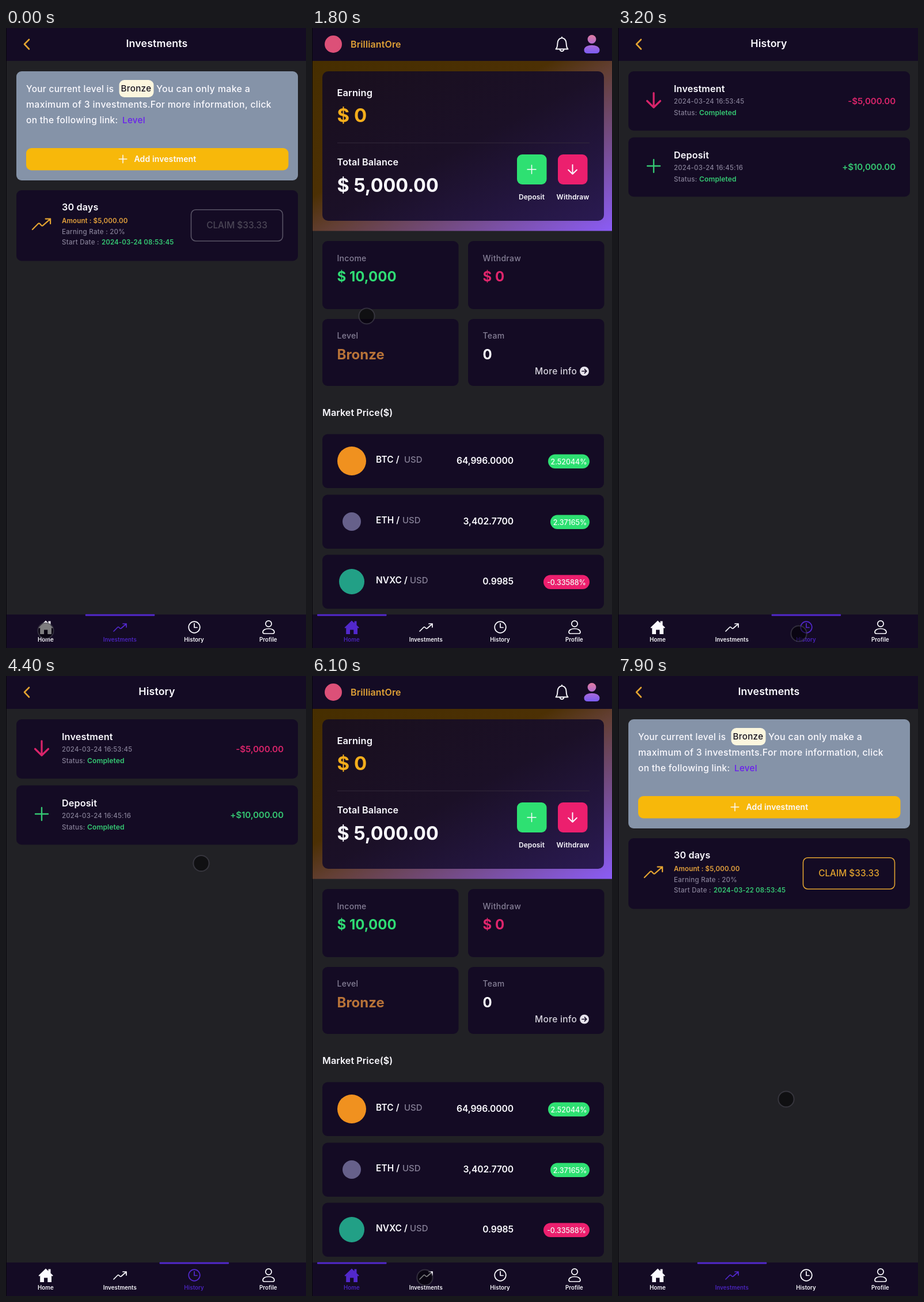
Write an HTML page that moves like this. It is 521 by 1074 pixels and loops after 8 s.

```html
<!DOCTYPE html>
<html lang="en">
<head>
<meta charset="utf-8">
<title>Investment app</title>
<style>
  html, body { margin: 0; width: 100%; height: 100%; overflow: hidden; background: #212125; }
  svg { display: block; width: 100%; height: 100%; }
  text { font-family: Inter, "Open Sans", sans-serif; white-space: pre; }
</style>
</head>
<body>
<svg id="stage" viewBox="0 0 521 1074"></svg>
<script>
const LOOP = 8000, STEP = 100;
const PANEL = '#140b24', GOLD = '#e2a331', GREEN = '#2ee072', PINK = '#ec1f6e';
const MUTED = '#857f96', WHITE = '#fbfaff', ACTIVE = '#5228cc';

// drawing helpers
const rect = (x, y, w, h, r, fill, more = '') =>
  `<rect x="${x}" y="${y}" width="${w}" height="${h}" rx="${r}" fill="${fill}" ${more}/>`;
const disc = (x, y, r, fill) => `<circle cx="${x}" cy="${y}" r="${r}" fill="${fill}"/>`;
const line = (d, color, width = 2) =>
  `<path d="${d}" fill="none" stroke="${color}" stroke-width="${width}" stroke-linecap="round" stroke-linejoin="round"/>`;
const text = (x, y, str, size, fill = WHITE, { w = 600, at = 'start', gap = 0.008 } = {}) =>
  `<text x="${x}" y="${y}" font-size="${size}" fill="${fill}" font-weight="${w}" text-anchor="${at}" letter-spacing="${gap * size}">${str}</text>`;
const plus = (x, y, r, color, width) => line(`M${x - r} ${y}h${2 * r}M${x} ${y - r}v${2 * r}`, color, width);
const down = (x, y, r, color, width) =>
  line(`M${x} ${y - r}v${2 * r}M${x - r * 0.92} ${y + r * 0.1}l${r * 0.92} ${r * 0.9}l${r * 0.92} ${-r * 0.9}`, color, width);
const trend = (x, y, k, color, width) =>
  line(`M${x - 11 * k} ${y + 6 * k}l${7 * k} ${-7 * k}q${k} ${-k} ${2 * k} 0l${2 * k} ${2 * k}q${k} ${k} ${2 * k} 0l${9 * k} ${-8 * k}m${-6 * k} 0h${6 * k}v${6 * k}`, color, width);
const card = (x, y, w, h) => rect(x, y, w, h, 9, PANEL);

const REG = { w: 450, gap: 0.02 }, BOLD = { w: 700, gap: 0 };
const MID = { at: 'middle' }, END = { at: 'end', gap: -0.008 };

const defs = `<defs>
  <linearGradient id="glow" x1="0" y1="0" x2="1" y2="1">
    <stop offset="0" stop-color="#462e00"/><stop offset=".4" stop-color="#4c3004"/>
    <stop offset=".52" stop-color="#633f34"/><stop offset="1" stop-color="#8b5cf6"/>
  </linearGradient>
  <linearGradient id="hero" x1="0" y1="0" x2="1" y2="1">
    <stop offset="0" stop-color="#190f1d"/><stop offset=".5" stop-color="#1b1027"/><stop offset="1" stop-color="#2a1a52"/>
  </linearGradient>
  <linearGradient id="user" gradientUnits="userSpaceOnUse" x1="0" y1="12" x2="0" y2="44">
    <stop offset="0" stop-color="#e07ca0"/><stop offset=".6" stop-color="#a468dc"/><stop offset="1" stop-color="#7a5cf2"/>
  </linearGradient>
</defs>`;

const backdrop = rect(0, 0, 521, 1074, 0, '#212125') + rect(0, 0, 521, 57, 0, PANEL);

const titleBar = title =>
  line('M40 20L32 28L40 36.5', GOLD, 2.6) + text(262, 33, title, 17.8, WHITE, MID);

function nav(active) {
  const items = [
    ['Home', c => `<path fill="${c}" d="M56.5 1038.5L69 1026.5L73.5 1030.8V1027.5H77.5V1034.6L81.8 1038.5L80.4 1040L79 1038.8V1050H72.3V1042.5H66V1050H59.2V1038.8L57.9 1040Z"/>`],
    ['Investments', c => trend(198, 1039, 1, c, 1.7)],
    ['History', c => `<circle cx="327" cy="1038" r="9.8" fill="none" stroke="${c}" stroke-width="1.7"/>` + line('M327 1031.5V1038.5H332', c, 1.7)],
    ['Profile', c => `<circle cx="456" cy="1032" r="5.2" fill="none" stroke="${c}" stroke-width="1.7"/>` +
      line('M446 1046.5C446 1038.5 466 1038.5 466 1046.5Q466 1049 463 1049H449Q446 1049 446 1046.5Z', c, 1.7)]
  ];
  let out = rect(0, 1016, 521, 58, 0, PANEL);
  items.forEach(([label, icon], i) => {
    const x = 69 + i * 128.8, on = i === active;
    if (on) out += rect(x - 60, 1015.5, 120.5, 3, 1, ACTIVE);
    out += icon(on ? ACTIVE : WHITE) + text(x, 1063, label, 9.7, on ? '#4a24bd' : WHITE, MID);
  });
  return out;
}

function tile(x, y, label, value, color) {
  return card(x, y, 236.5, y < 400 ? 118 : 116) +
    text(x + 25.5, y + (y < 400 ? 35 : 34), label, 14, MUTED, REG) +
    text(x + 25.5, y + 70, value, 24, color, BOLD);
}

function coin(y, name, usdX, color, r, price, change, pillX) {
  return card(18, y, 489, 93.5) + disc(69, y + 46.5, r, color) +
    text(111, y + 49.5, name + ' /', 15.4) +
    text(usdX, y + 49.5, 'USD', 15, MUTED, { w: 450, gap: 0 }) +
    text(350, y + 51.5, price, 15.7, WHITE, END) +
    rect(pillX, y + 35, 482 - pillX, 24.5, 12.2, change[0] === '-' ? PINK : GREEN) +
    text((pillX + 482) / 2, y + 52, change, 12.4, '#f2fff6', { w: 450, at: 'middle', gap: 0 });
}

const home = backdrop +
  disc(37, 28, 15, '#dc5078') + text(67, 34, 'BrilliantOre', 16, '#dfa136') +
  line('M423.5 36.5H444.5C441.5 33.5 442 30.5 441.5 26C440.8 14.5 427.2 14.5 426.5 26C426 30.5 426.5 33.5 423.5 36.5ZM430.5 37C431 41.3 437 41.3 437.5 37M434 17.2V15.8', WHITE, 1.9) +
  disc(486, 19.5, 7.4, 'url(#user)') + `<path fill="url(#user)" d="M472.5 38C472.5 27 499.5 27 499.5 38Q499.5 44 493 44H479Q472.5 44 472.5 38Z"/>` +
  rect(0, 57, 521, 294.5, 0, 'url(#glow)') + rect(18, 75, 489, 259, 10, 'url(#hero)') +
  text(43.5, 118, 'Earning', 16.4) + text(43.5, 163, '$ 0', 33, '#f5ae1c', BOLD) +
  rect(44, 198.5, 438, 1, 0, '#352a3d') +
  text(43.5, 238, 'Total Balance', 16.2) + text(43.5, 284, '$ 5,000.00', 32.4, WHITE, BOLD) +
  rect(356, 219, 51.5, 52, 9, GREEN) + plus(381.5, 245, 7.5, WHITE, 1.5) +
  rect(427, 219, 51.5, 52, 9, PINK) + down(452.5, 245, 8, WHITE, 2) +
  text(381.5, 297, 'Deposit', 12, WHITE, MID) + text(453, 297, 'Withdraw', 12, WHITE, MID) +
  tile(18, 369, 'Income', '$ 10,000', '#2fdc74') + tile(271, 369, 'Withdraw', '$ 0', '#e0256c') +
  tile(18, 504, 'Level', 'Bronze', '#b87338') + tile(271, 504, 'Team', '0', WHITE) +
  text(387, 600, 'More info', 15.5, '#d8d5df', REG) + disc(473, 594.5, 8, '#e6e3ec') +
  line('M469 594.5H476.5M473.5 591.2L476.8 594.5L473.5 597.8', PANEL, 1.7) +
  text(18, 672, 'Market Price($)', 16) +
  coin(703.5, 'BTC', 160, '#f0911f', 25, '64,996.0000', '2.52044%', 410) +
  coin(808.5, 'ETH', 157, '#66608a', 16, '3,402.7700', '2.37165%', 414) +
  coin(912.5, 'NVXC', 170, '#22a086', 22, '0.9985', '-0.33588%', 402) +
  nav(0);

function invest(date, claimLine, claimText) {
  return backdrop + titleBar('Investments') +
    rect(18, 75, 489, 189, 9, '#8593a8') +
    text(35, 111, 'Your current level is', 15.4, WHITE, REG) +
    rect(196.5, 90, 60, 30, 9, '#fcf6de') + text(199.5, 110, 'Bronze', 15.2, '#17131f', REG) +
    text(261, 111, 'You can only make a', 16, WHITE, REG) +
    text(35, 138, 'maximum of 3 investments.For more information, click', 15.8, WHITE, REG) +
    text(35, 165, 'on the following link:', 15.5, WHITE, REG) + text(202, 165, 'Level', 15.2, '#6a1fee', REG) +
    rect(35, 208, 455.5, 38.5, 9, '#f7b80a') + plus(203, 227, 6.8, WHITE, 1.5) +
    text(222.5, 232, 'Add investment', 14) +
    card(18, 281, 489, 122.5) + trend(61.5, 340.5, 1.42, GOLD, 2.2) +
    text(97, 316, '30 days', 16.2) +
    text(97, 337.5, 'Amount : $5,000.00', 11.6, '#e2a03c') +
    text(97, 356.5, 'Earning Rate : 20%', 11.6, MUTED, REG) +
    text(97, 375, 'Start Date :', 11.6, MUTED, REG) + text(166, 375, date, 11.5, '#35c873') +
    rect(321.5, 314.8, 159, 54.2, 8, 'none', `stroke="${claimLine}" stroke-width="1.6"`) +
    text(401, 347, 'CLAIM $33.33', 15.4, claimText, { w: 500, at: 'middle', gap: 0 }) +
    nav(1);
}

function entry(y, title, date, amount, color, icon) {
  return card(18, y, 489, 102.7) + icon +
    text(97, y + 36, title, 16.2) + text(97, y + 56, date, 11.4, MUTED, REG) +
    text(97, y + 76, 'Status:', 11.6, MUTED, REG) + text(141, y + 76, 'Completed', 12.1, '#35c873') +
    text(482, y + 56.5, amount, 15.1, color, END);
}

const history = backdrop + titleBar('History') +
  entry(75, 'Investment', '2024-03-24 16:53:45', '-$5,000.00', '#d9246a', down(62, 125, 12.5, '#d9246a', 3.2)) +
  entry(189.5, 'Deposit', '2024-03-24 16:45:16', '+$10,000.00', '#35c873', plus(62, 239, 11, '#35c873', 2.4)) +
  nav(2);

const screens = {
  claimed: invest('2024-03-24 08:53:45', '#595466', '#4b4656'),
  home, history,
  ready: invest('2024-03-22 08:53:45', GOLD, '#e0a22e')
};
const schedule = [[0, 'claimed'], [300, 'home'], [3000, 'history'], [5700, 'home'], [6800, 'ready']];

// pointer stops: time, x, y
const path = [
  [0, 69, 1044], [200, 70, 1043], [600, 234, 826], [1000, 258, 640], [1400, 170, 540],
  [1800, 95, 499], [2100, 125, 560], [2600, 290, 990], [2800, 316, 1046], [3200, 314, 1049],
  [3300, 330, 980], [3600, 399, 571], [3900, 378, 369], [4100, 378, 369], [4700, 300, 280],
  [5200, 242, 230], [5500, 241, 229], [5700, 71, 1042], [5800, 74, 1043], [6100, 196, 1042],
  [6900, 198, 1041], [7300, 236, 950], [7600, 274, 829], [7900, 292, 733], [8000, 294, 728]
];

const stage = document.getElementById('stage');
stage.innerHTML = defs +
  Object.entries(screens).map(([id, body]) => `<g id="${id}" visibility="hidden">${body}</g>`).join('') +
  rect(0, 0, 1, 1074, 0, '#08060c') +
  `<circle id="pointer" r="13.6" fill="#000" fill-opacity=".5" stroke="#4a4754" stroke-opacity=".6" stroke-width="2"/>`;
const pointer = document.getElementById('pointer');
const groups = Object.keys(screens).map(id => document.getElementById(id));

function render(t) {
  const current = schedule.filter(s => s[0] <= t).pop()[1];
  groups.forEach(g => g.setAttribute('visibility', g.id === current ? 'visible' : 'hidden'));
  const i = path.findIndex(p => p[0] > t);
  const [t0, x0, y0] = path[i - 1], [t1, x1, y1] = path[i];
  const k = (t - t0) / (t1 - t0);
  pointer.setAttribute('cx', x0 + (x1 - x0) * k);
  pointer.setAttribute('cy', y0 + (y1 - y0) * k);
}

const start = performance.now();
function tick() {
  const t = (performance.now() - start) % LOOP;
  render(Math.floor(t / STEP) * STEP);
  requestAnimationFrame(tick);
}
render(0);
requestAnimationFrame(tick);
</script>
</body>
</html>
```
